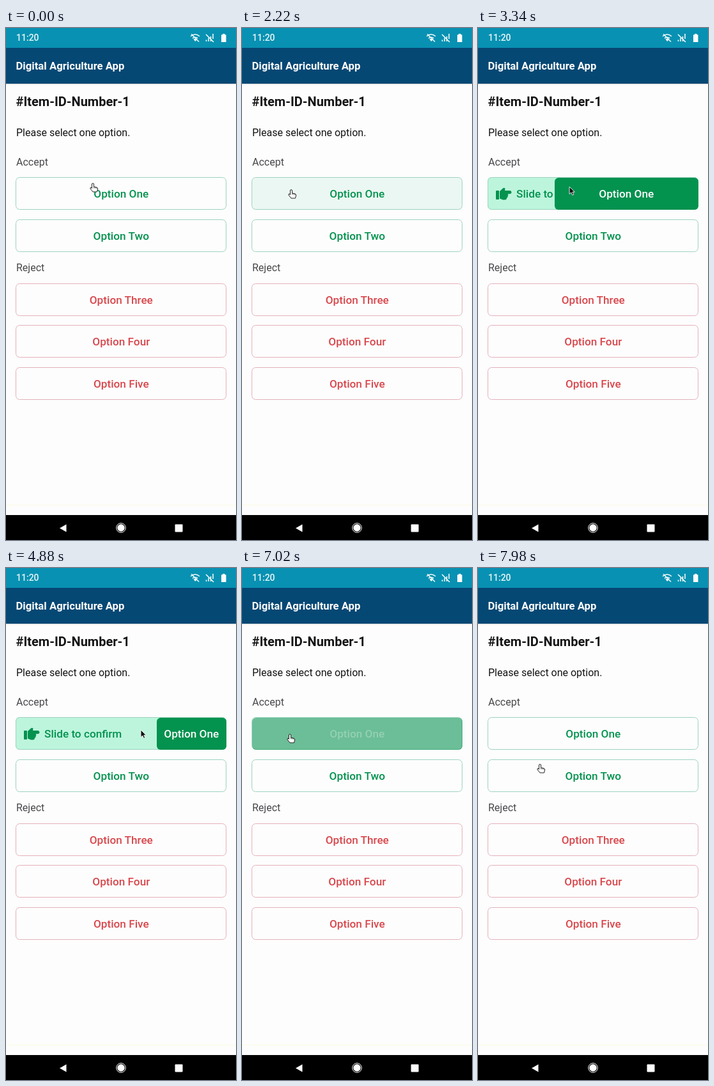
An HTML page for the animation above (8000 ms loop, 360 by 800 pixels).

```html
<!DOCTYPE html>
<html lang="en">
<head>
<meta charset="utf-8">
<title>Slide to confirm</title>
<style>
  html, body { margin: 0; width: 100%; height: 100%; overflow: hidden; background: #fdfdfd; }
  svg { display: block; width: 360px; height: 800px; font-family: Roboto, sans-serif; font-size: 16px; }
  .label { font-size: 17.2px; font-weight: 500; }
  .mid { text-anchor: middle; }
  .accept { fill: #04924f; }
  .reject { fill: #d8474c; }
  .box { fill: none; stroke: #9ed3c0; }
  .box.no { stroke: #e6b0bb; }
</style>
</head>
<body>
<svg viewBox="0 0 360 800">
  <defs>
    <linearGradient id="shade" x2="0" y2="1">
      <stop stop-color="#000" stop-opacity=".16"/>
      <stop offset="1" stop-color="#000" stop-opacity="0"/>
    </linearGradient>
  </defs>
  <rect width="360" height="800" fill="#fdfdfd"/>
  <path d="M0 745.5H360" stroke="#fbfbe2"/>

  <!-- Status bar and header -->
  <rect width="360" height="32" fill="#0891b2"/>
  <rect y="31" width="360" height="56" fill="#064874"/>
  <rect y="87" width="360" height="2" fill="url(#shade)"/>
  <text x="16" y="20.3" font-size="14" font-weight="500" fill="#e6f6f6">11:20</text>
  <g fill="none" stroke="#f0fafa" stroke-width="1.6">
    <path d="M289 13Q296 7 303 13M292 16Q296 13 300 16"/>
    <path d="M294 17.5L296.3 20.5L299 17Z" fill="#f0fafa" stroke-width="1"/>
    <path d="M290 9.5L302 21.5"/>
    <path d="M313.5 21V18.5M317 21V15.5M320.5 21V13M324 17V9M313 10L325 22"/>
  </g>
  <path d="M337 10.5H339V9H342.5V10.5H344.5V22H337Z" fill="#fdfdfd"/>
  <text x="15.5" y="65" font-size="16.7" font-weight="700" fill="#fdfdfd">Digital Agriculture App</text>

  <!-- Page -->
  <text x="15.5" y="122" font-size="20" font-weight="700" fill="#141416">#Item-ID-Number-1</text>
  <text x="16" y="169" fill="#141416">Please select one option.</text>
  <text x="16" y="215" fill="#48484c">Accept</text>
  <text x="16" y="380" fill="#48484c">Reject</text>
  <rect id="tint" x="16" y="234" width="329" height="50" rx="6" fill="#ebf7f2"/>
  <g id="options"></g>

  <!-- Slide control -->
  <g id="panel">
    <rect x="15.5" y="233.5" width="329" height="50" rx="6" fill="#bcf5dc" stroke="#9ed3c0"/>
    <rect class="accept" x="28" y="254" width="5" height="14" rx="1"/>
    <path class="accept" d="M34 255L39 250.5Q41 249 42.5 251L42 254H50Q52.5 254.5 52.5 256.7T50 259.3H46.5Q48 261 46.5 262.7Q47 264.5 45 265.5Q45 268.5 42 268.5H39L34 266.5Z"/>
    <text class="label accept" x="60" y="265">Slide to confirm</text>
  </g>
  <g id="slider">
    <rect id="knob" class="accept" y="234" height="50" rx="6"/>
    <text id="knobLabel" class="label mid" y="265" fill="#fdfdfd">Option One</text>
  </g>

  <!-- Navigation bar -->
  <rect y="761" width="360" height="39"/>
  <g fill="#fdfdfd">
    <path d="M84 781.5L94.5 775.5V787.5Z"/>
    <circle cx="180" cy="781" r="5.7"/>
    <circle cx="180" cy="781" r="7.3" fill="none" stroke="#fdfdfd"/>
    <rect x="264.5" y="775.5" width="12" height="12" rx="1"/>
  </g>

  <g id="hand" fill="#fff" stroke="#222" stroke-linejoin="round">
    <path d="M-1.5 1Q-1.5 -.3 0 -.3T1.5 1V5L6 6Q8 6.5 7.5 9L6.5 13H0L-4 8Q-4.5 6 -3 6L-1.5 7.5Z"/>
    <path d="M1.5 5V7.5M3.6 5.6V7.7M5.7 6V8" stroke-width=".7"/>
  </g>
  <path id="arrow" d="M0 0V11.5L2.7 9L4.7 13.2L6.7 12.3L4.8 8.2H8.3Z" fill="#111" stroke="#f4f8f6" stroke-width=".9"/>
</svg>
<script>
  const LOOP = 8000, LEFT = 16, RIGHT = 345, MAX_LEFT = 236;
  const get = id => document.getElementById(id);
  const [tint, panel, slider, knob, knobLabel, hand, arrow] =
    ['tint', 'panel', 'slider', 'knob', 'knobLabel', 'hand', 'arrow'].map(get);

  const options = [['One', 233.5], ['Two', 299.5], ['Three', 399.5], ['Four', 464.5], ['Five', 530.5]];
  get('options').innerHTML = options.map(([name, top], i) => `
    <rect class="box ${i > 1 ? 'no' : ''}" x="15.5" y="${top}" width="329" height="50" rx="6"/>
    <text class="label mid ${i > 1 ? 'reject' : 'accept'}" x="180.3" y="${top + 31.5}">Option ${name}</text>`).join('');

  // Pointer tip: time, x, y
  const pointer = [
    [0, 136, 243], [1500, 77, 253], [2500, 77, 253], [3340, 143, 248], [4200, 211, 253],
    [4920, 211, 253], [6100, 73, 251], [6600, 73, 251], [7020, 75, 260], [7300, 75, 260],
    [7900, 97, 307], [LOOP, 97, 307]
  ];

  const clamp = (v, lo = 0, hi = 1) => Math.min(hi, Math.max(lo, v));
  const ramp = (t, from, to) => clamp((t - from) / (to - from));

  function pointerAt(t) {
    const i = pointer.findIndex(key => key[0] > t);
    const [t0, x0, y0] = pointer[i - 1], [t1, x1, y1] = pointer[i];
    const k = ramp(t, t0, t1);
    return [x0 + (x1 - x0) * k, y0 + (y1 - y0) * k];
  }

  function show(el, visible) {
    el.setAttribute('visibility', visible ? 'visible' : 'hidden');
  }

  function draw(t) {
    const [x, y] = pointerAt(t);
    const dragging = t >= 2450 && t < 6900;
    const left = dragging ? Math.round(clamp(LEFT + 1.71 * (x - 82), LEFT, MAX_LEFT)) : LEFT;

    tint.setAttribute('opacity', ramp(t, 2120, 2220) * (1 - ramp(t, 6900, 7000)));
    slider.setAttribute('opacity', ramp(t, 2250, 2450) * (1 - ramp(t, 6900, 7190)));
    show(panel, left > LEFT);
    knob.setAttribute('x', left);
    knob.setAttribute('width', RIGHT - left);
    knobLabel.setAttribute('x', (left + RIGHT) / 2 - 0.2);

    show(hand, !dragging);
    show(arrow, dragging);
    (dragging ? arrow : hand).setAttribute('transform', `translate(${x} ${y})`);
  }

  function tick() {
    draw(performance.now() % LOOP);
    requestAnimationFrame(tick);
  }
  tick();
</script>
</body>
</html>
```
